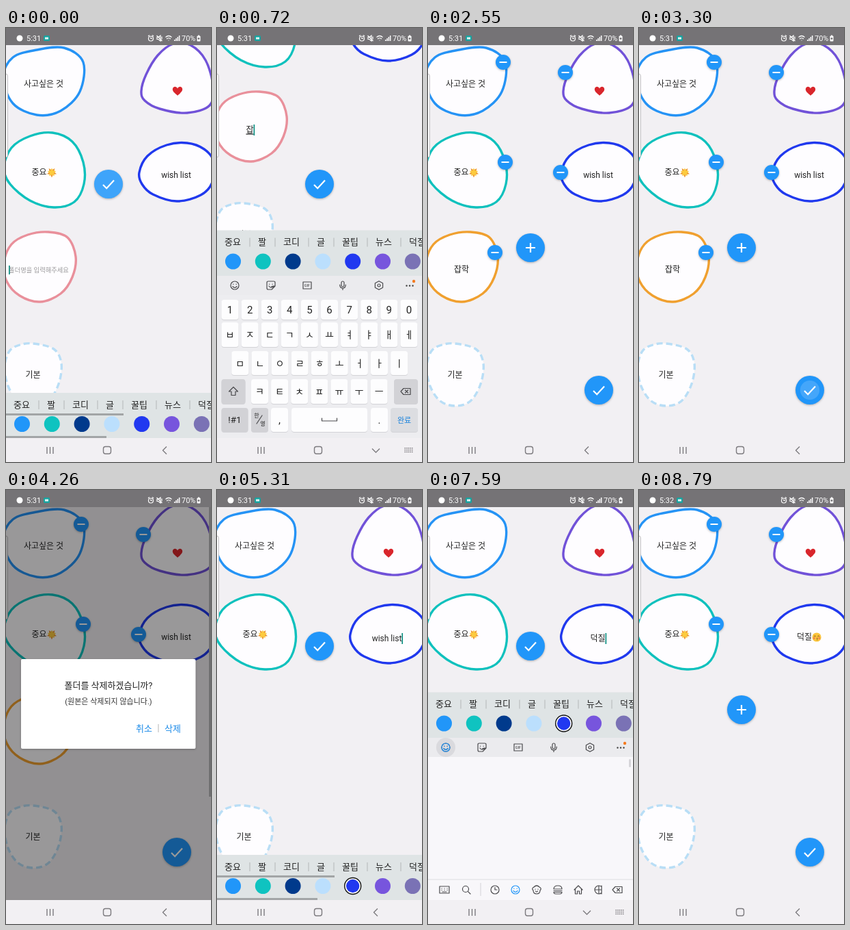
An HTML page for the animation above (9150 ms loop, 300 px wide and 634 px high).

```html
<!DOCTYPE html>
<html lang="ko">
<head>
<meta charset="utf-8">
<title>Folder bubbles</title>
<style>
html, body { margin: 0; width: 100%; height: 100%; overflow: hidden; background: #f2f0f3; }
svg { display: block; width: 300px; height: 634px; font-family: Roboto, "Noto Sans CJK KR", "Noto Sans CJK JP", "Noto Sans CJK", sans-serif; }
.fab, .minus { filter: drop-shadow(0 1.5px 1.5px rgba(0, 0, 0, .28)); }
.icon { fill: none; stroke: #4a4a4d; stroke-width: 1.2; stroke-linecap: round; stroke-linejoin: round; }
.nav { fill: none; stroke: #7d7b7f; stroke-width: 1.4; stroke-linejoin: round; }
</style>
</head>
<body>
<svg id="stage" viewBox="0 0 300 634"></svg>
<script>
const LOOP = 9150;
const BLUE = '#2196f9';
const $ = id => document.getElementById(id);
const show = (id, on) => $(id).setAttribute('visibility', on ? 'visible' : 'hidden');
const move = (id, x, y) => $(id).setAttribute('transform', `translate(${x} ${y})`);
const fade = (id, v) => $(id).setAttribute('opacity', v);

// Linear track through time, value pairs
function track(t, ...p) {
  if (t <= p[0]) return p[1];
  for (let i = 2; i < p.length; i += 2)
    if (t < p[i]) return p[i - 1] + (p[i + 1] - p[i - 1]) * (t - p[i - 2]) / (p[i] - p[i - 2]);
  return p[p.length - 1];
}

const latest = (t, steps) => steps.reduce((v, [at, s]) => t >= at ? s : v, '');

// (x, y) is the visual middle of the text
const text = (x, y, s, size, fill = '#222', anchor = 'middle') =>
  `<text x="${x}" y="${y}" dy=".37em" font-size="${size}" fill="${fill}" text-anchor="${anchor}">${s}</text>`;
const rect = (x, y, w, h, fill, r = 0) =>
  `<rect x="${x}" y="${y}" width="${w}" height="${h}" rx="${r}" fill="${fill}"/>`;
const circle = (x, y, r, fill, more = '') => `<circle cx="${x}" cy="${y}" r="${r}" fill="${fill}" ${more}/>`;
const icon = (x, y, d, color = '#4a4a4d') =>
  `<path class="icon" transform="translate(${x} ${y})" d="${d}" style="stroke:${color}"/>`;

// Smooth closed outline through flat x, y pairs
function blob(p) {
  const n = p.length / 2;
  const at = i => [p[(i + n) % n * 2], p[(i + n) % n * 2 + 1]];
  let d = `M${at(0)}`;
  for (let i = 0; i < n; i++) {
    const [a, b, c, e] = [at(i - 1), at(i), at(i + 1), at(i + 2)];
    d += `C${b.map((v, k) => v + (c[k] - a[k]) / 6)} ${c.map((v, k) => v - (e[k] - b[k]) / 6)} ${c}`;
  }
  return d + 'Z';
}
const bubble = (id, color, points, more = '') =>
  `<path id="${id}" d="${blob(points)}" fill="#fefdff" stroke="${color}" stroke-width="3.4" ${more}/>`;

const minus = (x, y) => `<g class="minus">${circle(x, y, 11, BLUE)}${rect(x - 5.5, y - 1, 11, 2, '#fff')}</g>`;
const CHECK = 'M-8 1l5.2 5.2L8-5.5';
const PLUS = 'M-7 0H7M0-7V7';
const fab = (id, x, y, d) => `<g id="${id}" transform="translate(${x} ${y})">
  <g class="fab">${circle(0, 0, 21, BLUE)}</g>${circle(0, 0, 21, '#fff', `id="${id}Ripple" opacity="0"`)}
  <path d="${d}" fill="none" stroke="#fff" stroke-width="2.2"/></g>`;

const HEART = 'M0 6.8C-4 3-7.2 1-7.2-2.4C-7.2-6.8-1.6-7.6 0-3.6C1.6-7.6 7.2-6.8 7.2-2.4C7.2 1 4 3 0 6.8Z';
const FACE = `<g id="face">${circle(0, 0, 6.6, '#fbc43b')}${circle(-3.7, 1.4, 1.6, '#f08a4b')}${circle(3.7, 1.4, 1.6, '#f08a4b')}
  <path d="M-4-1q1.4-2 2.8 0M1.2-1q1.4-2 2.8 0M0 1q2 .7 .3 1.6q1.8 .8 0 1.7" fill="none" stroke="#6b4316" stroke-width=".9"/></g>`;

function star(x, y) {
  let d = '';
  for (let i = 0; i < 10; i++) {
    const a = Math.PI * i / 5 - Math.PI / 2, r = i % 2 ? 3.2 : 6.6;
    d += `${i ? 'L' : 'M'}${r * Math.cos(a)} ${r * Math.sin(a)}`;
  }
  return `<g transform="translate(${x} ${y})"><path d="${d}Z" fill="#ef9a35" transform="rotate(36) scale(1.12)"/>
    <path d="${d}Z" fill="#fccb3e"/></g>`;
}

const field = id => `<text id="${id}" dy=".37em" font-size="12" fill="#222"></text>
  <rect id="${id}Caret" width="1.6" fill="#00897b"/><use id="${id}Face" href="#face"/>`;

function setField(id, x, y, s, { editing, composing, face }) {
  const el = $(id), empty = !s, size = empty ? 9.3 : 12;
  const body = empty ? '폴더명을 입력해주세요' :
    composing ? `${s.slice(0, -1)}<tspan text-decoration="underline">${s.slice(-1)}</tspan>` : s;
  if (el.body !== body) {
    el.innerHTML = el.body = body;
    el.setAttribute('font-size', size);
    el.setAttribute('fill', empty ? '#9b9a9c' : '#222');
    el.setAttribute('style', 'white-space:pre');
  }
  const w = el.getComputedTextLength(), left = x - (w + (face ? 14 : 0)) / 2;
  el.setAttribute('x', left);
  el.setAttribute('y', y);
  move(id + 'Face', left + w + 7, y);
  show(id + 'Face', face);
  const caret = $(id + 'Caret');
  caret.setAttribute('x', empty ? left : left + w + (face ? 14 : 0));
  caret.setAttribute('y', y - (empty ? 7 : 8));
  caret.setAttribute('height', empty ? 13 : 16);
  show(id + 'Caret', editing);
}

const palette = [BLUE, '#0fc3c0', '#003a8c', '#bbdffd', '#2138f0', '#7755dd', '#7a72b5',
  '#c8ccd2', '#e0dad9', '#a97fc4', '#e9909b', '#f0a02f', '#f5c94a', '#8bc48a'];

function chips() {
  let x = 11;
  return ['중요', '짤', '코디', '글', '꿀팁', '뉴스', '덕질'].map(s => {
    const out = text(x, 17, s, 13, '#222', 'start') + rect(x + s.length * 12 + 12.5, 11, 1, 13, '#b3b6b7');
    x += s.length * 12 + 25;
    return out;
  }).join('');
}

const key = (x, y, w, h, label, size = 14, fill = '#fdfdfe', color = '#222') =>
  rect(x, y + 1, w, h, '#d3d3d7', 4) + rect(x, y, w, h, fill, 4) + text(x + w / 2, y + h / 2, label, size, color);
const row = (chars, x, y, h, size) =>
  [...chars].map((c, i) => key(x + i * 29.1, y, 25, h, c, size)).join('');

const SMILE = 'M6 0A6 6 0 1 1-6 0A6 6 0 1 1 6 0M-3 1.5q3 3.6 6 0M-2.2-2v.4M2.2-2v.4';
const STICKER = 'M6 1V-4Q6-6 4-6H-4Q-6-6-6-4V4Q-6 6-4 6H1ZL1 3Q1 1 3 1H6M-3 1q2 3 4 1M-2.4-2v.3M2.2-2v.3';
const ERASE = 'M-7 0L-3-4.5H7V4.5H-3ZM-.5-2L3.5 2M3.5-2L-.5 2';
const GREY = '#d2d2d6';

const toolbar = () => rect(0, 0, 300, 28, '#ebebee') +
  circle(26, 14, 14, '#dadade', 'id="tabOn"') +
  icon(26, 14, SMILE) + `<g id="smileOn">${icon(26, 14, SMILE, BLUE)}</g>` + icon(79, 14, STICKER) +
  icon(132, 14, 'M-6-5H6V5H-6Z') + text(132, 14, 'GIF', 5.5, '#333') +
  icon(184, 14, 'M-2-4a2 2 0 0 1 4 0V0a2 2 0 0 1-4 0ZM-4.3-1Q-4.3 4 0 4T4.3-1M0 4V6.5') +
  icon(237, 14, 'M0-6.3L5.6-3.2V3.2L0 6.3L-5.6 3.2V-3.2ZM2 0A2 2 0 1 1-2 0A2 2 0 1 1 2 0') +
  [277.5, 282, 286.5].map(x => circle(x, 14.5, 1.2, '#444')).join('') + circle(288, 8, 2.2, '#f47b20');

const keys = () => rect(0, 28, 300, 209, '#ededf0') +
  row('1234567890', 6.5, 35, 29, 15) + row('ㅂㅈㄷㄱㅅㅛㅕㅑㅐㅔ', 6.5, 68, 36) +
  row('ㅁㄴㅇㄹㅎㅗㅓㅏㅣ', 21.3, 110, 35) + row('ㅋㅌㅊㅍㅠㅜㅡ', 50, 151, 36) +
  key(6.5, 151, 35, 36, '', 14, GREY) + icon(24, 169, 'M0-6.5L6.5 0H3V5.5H-3V0H-6.5Z') +
  key(259, 151, 35, 36, '', 14, GREY) + icon(276, 169, ERASE) +
  key(6.5, 193, 39, 35, '!#1', 13.5, GREY) + key(50, 193, 25, 35, '', 10, GREY) +
  text(58, 204, '한', 8) + text(67, 216, '영', 8) + icon(62, 210, 'M4-6L-4 6') +
  key(79, 193, 25, 35, ',', 15) + key(109, 193, 111, 35, '') + icon(164.5, 210, 'M-11-2V2H11V-2') +
  key(225, 193, 25, 35, '.', 15) + key(254, 193, 40, 35, '완료', 11, '#dcdde1', '#1680dc');

function faces() {
  let out = '';
  for (let i = 0; i < 40; i++)
    out += `<use href="#face" transform="translate(${23 + i % 8 * 36} ${49 + (i >> 3) * 36}) scale(1.6)"/>`;
  return out;
}

const emojiPane = () => rect(0, 28, 300, 209, '#f8f7fa') + `<g id="faces">${faces()}</g>` +
  rect(294, 31, 3, 12, '#d6d5d9', 1.5) + rect(0, 207, 300, 30, '#f8f7fa') + rect(0, 206.5, 300, 1, '#dedde1') +
  icon(24, 222, 'M-7-5H7V5H-7ZM-4-2h.3M0-2h.3M4-2h.3M-4 .5h.3M0 .5h.3M4 .5h.3M-3 3H3') +
  icon(56, 222, 'M3.5-1A4.5 4.5 0 1 1-5.5-1A4.5 4.5 0 1 1 3.5-1M2.3 2.3L6 6') +
  rect(76.5, 212, 1, 19, '#d2d1d5') +
  icon(98, 222, 'M6 0A6 6 0 1 1-6 0A6 6 0 1 1 6 0M0-3.5V0H3') + icon(128, 222, SMILE, BLUE) +
  icon(159, 222, 'M-4-4Q0-8 4-4Q8-2 5 1Q5 6 0 6T-5 1Q-8-2-4-4M-2-1v.3M2-1v.3M-1.5 2Q0 4 1.5 2') +
  icon(190, 222, 'M-6-1Q-6-6 0-6T6-1ZM-6 1.5H6M-6 3.5H6Q6 6 3 6H-3Q-6 6-6 3.5') +
  icon(220, 222, 'M-6 0L0-6L6 0M-4.5-1V6H-1.5V2H1.5V6H4.5V-1') +
  icon(250, 222, 'M4-4.5A6 6 0 1 0 4 4.5M0-6V6M-6 0H4M4-6V6') + icon(277, 222, ERASE);

const statusBar = () => rect(0, 0, 300, 25, '#757376') + circle(20, 15, 4.5, '#fff') +
  `<text id="clock" x="30" y="19" font-size="11" fill="#fff"></text>` +
  rect(55, 11, 9, 8, '#18a3a0', 1.5) + rect(57, 13.5, 5, 3, '#dff5f3') +
  `<g fill="none" stroke="#fff" stroke-width="1.2"><path d="M215.5 15.5a3.5 3.5 0 1 1-7 0a3.5 3.5 0 1 1 7 0M212 13.5V15.5H214M208 12l2-1.5M216 12l-2-1.5"/>
   <path d="M221 13.5h2l3-2.5v8l-3-2.5h-2ZM220.5 11l8 8M228 12.5v4"/><path d="M233.5 13.5q4.5-4 9 0M235 16q3-2.5 6 0M237.5 18h1"/></g>` +
  [0, 1, 2, 3].map(i => rect(246 + i * 2.3, 17 - i * 2, 1.5, 2 + i * 2, '#fff')).join('') +
  `<text x="257" y="19" font-size="11" fill="#fff">70%</text>` +
  rect(279.5, 11.5, 5, 8, '#fff', 1) + rect(281, 10.5, 2, 2, '#fff') + circle(282, 15.5, 1.4, '#757376');

const keyboardDots = () => [0, 1, 2].map(r => [0, 1, 2, 3, 4].map(c =>
  rect(274.5 + c * 2.6, 613 + r * 2.8, 1.5, 1.5, '#7d7b7f')).join('')).join('');

const dialog = () => rect(0, 25, 300, 574, 'rgba(0,0,0,.4)') +
  `<g class="fab">${rect(22, 247, 255.5, 131, '#fff', 2)}</g>` +
  text(150, 285, '폴더를 삭제하겠습니까?', 13) + text(150, 309, '(원본은 삭제되지 않습니다.)', 11, '#333') +
  text(202, 348, '취소', 13, '#1c8be8') + rect(222.5, 342, 1, 12, '#b5b5b5') + text(244, 348, '삭제', 13, '#1c8be8');

$('stage').innerHTML = `<defs>${FACE}</defs>
${rect(0, 0, 300, 634, '#f2f0f3')}
<g id="content">
  ${bubble('shop', '#2593f5', [-4, 72, 10, 43, 45, 32, 85, 29, 113, 50, 108, 93, 80, 121, 45, 127, 10, 110])}
  ${text(55, 82, '사고싶은 것', 12)}
  ${bubble('love', '#7152d8', [198, 92, 205, 68, 222, 40, 245, 23, 270, 25, 292, 47, 303, 85, 298, 113, 265, 124, 225, 118, 203, 106])}
  <path d="${HEART}" transform="translate(251 92)" fill="#d9262c"/>
  ${bubble('key', '#0fc1bd', [68, 153, 97, 166, 113, 196, 114, 228, 100, 254, 70, 262, 35, 252, 6, 228, -3, 204, 8, 175, 35, 158])}
  ${text(48.5, 211, '중요', 12)}${star(67, 211)}
  ${bubble('wish', '#2039ee', [195, 211, 207, 187, 235, 171, 265, 168, 290, 177, 304, 195, 302, 225, 285, 244, 250, 253, 215, 243, 199, 228])}
  ${field('wishText')}
  <g id="fresh">${bubble('freshShape', '#e9909b', [62, 298, 90, 306, 102, 334, 97, 364, 80, 388, 50, 400, 20, 391, 1, 370, -3, 343, 8, 316, 32, 302])}
  ${field('freshText')}</g>
  ${bubble('base', '#b9def6', [40, 461, 70, 469, 81, 490, 77, 520, 62, 545, 40, 552, 18, 545, 3, 523, -2, 495, 5, 472, 20, 463], 'stroke-dasharray="9 5"')}
  ${text(39.5, 507, '기본', 12)}
</g>
<rect x="-6" y="67" width="8.5" height="122" rx="3" fill="#fafafa" stroke="#b5b4b6" stroke-width=".8"/>
<g id="edit">${minus(110, 50)}${minus(201, 65)}${minus(113, 196)}${minus(194, 211)}<g id="freshMinus">${minus(98, 328)}</g>
  ${fab('add', 150, 321, PLUS)}${fab('done', 250, 529, CHECK)}</g>
<g id="scrollbar">${rect(297, 25, 3, 423, '#b9b8ba')}</g>
<g id="input">${fab('save', 150, 228, CHECK)}
  <g id="panel">${rect(0, 0, 300, 67, '#dfe4e5')}${chips()}
    <g id="colors">${palette.map((c, i) => circle(23.5 + i * 43.8, 45.5, 11.5, c)).join('')}
      <g id="ring">${circle(0, 45.5, 12, '#fff', 'id="ringEdge" stroke-width="1.4"')}${circle(0, 45.5, 9.7, '#fff', 'id="ringFill"')}</g></g>
    <g id="bars">${rect(0, 30, 172, 3, '#a2a5a6')}${rect(0, 63, 147, 3, '#a2a5a6')}</g></g>
  <g id="keyboard"><g id="keys">${keys()}</g><g id="emoji">${emojiPane()}</g>${toolbar()}</g></g>
${rect(0, 599, 300, 35, '#f2f0f3')}
<path class="nav" d="M60 612V622M64.5 612V622M69 612V622"/><rect class="nav" x="142.5" y="611.5" width="11" height="10.5" rx="3"/>
<path class="nav" id="back" d="M235 611.5L229.5 617L235 622.5"/>
<g id="hide"><path class="nav" d="M227 614.5L232.5 620L238 614.5"/>${keyboardDots()}</g>
<g id="dialog">${dialog()}</g>
${statusBar()}`;

const freshSteps = [[300, 'ㅈ'], [450, '자'], [630, '잡'], [780, '잡ㅎ'], [960, '잡하'], [1140, '잡학']];
const wishSteps = [[0, 'wish list'], [5850, 'wish lis'], [5940, 'wish li'], [6030, 'wish l'], [6120, 'wish '],
  [6210, 'wish'], [6270, 'wis'], [6330, 'wi'], [6420, 'w'], [6480, ''],
  [6630, 'ㄷ'], [6780, '더'], [6900, '덕'], [7050, '덕ㅈ'], [7200, '덕지'], [7350, '덕질']];
const freshColor = [[0, 10], [1590, 9], [1830, 7], [2040, 11]];
const picked = [[0, 10], [1590, 9], [1770, 7], [2040, 11], [5000, 4]];

function draw(t) {
  const first = t < 2370, second = t >= 5310 && t < 8610, input = first || second;
  const up = track(t, 30, 0, 150, 1, 2190, 1, 2340, 0, 5370, 0, 5520, 1, 8430, 1, 8580, 0);
  const emoji = t >= 7500;

  move('content', 0, -track(t, 30, 0, 150, 205, 2190, 205, 2340, 0));
  move('panel', 0, 533 - 237.5 * up);
  move('keyboard', 0, 599 - 237 * up);
  show('input', input);
  show('edit', !input);
  for (const [id, on] of [['keys', !emoji], ['emoji', emoji], ['tabOn', emoji], ['smileOn', emoji], ['faces', t >= 7620]])
    $(id).style.display = on ? '' : 'none';
  show('back', up < .5);
  show('hide', up >= .5);
  fade('bars', track(t, 300, 1, 480, 0, 5300, 0, 5310, 1, 5520, 1, 5700, 0));

  move('colors', -track(t, 1260, 0, 1500, 200, 1680, 200, 1770, 94, 1860, 94, 2010, 290, 5000, 290, 5001, 0), 0);
  const sel = latest(t, picked);
  move('ring', 23.5 + sel * 43.8, 0);
  $('ringFill').setAttribute('fill', palette[sel]);
  $('ringEdge').setAttribute('stroke', sel === 7 ? '#8f9296' : '#111');
  $('freshShape').setAttribute('stroke', palette[latest(t, freshColor)]);

  setField('freshText', first ? 48 : 49, first ? 354 : 353, latest(t, freshSteps),
    { editing: first, composing: first, face: false });
  setField('wishText', second ? 248.5 : 249, second ? 217 : 215, latest(t, wishSteps),
    { editing: second, composing: t >= 6630 && t < 7500, face: t >= 8010 });

  fade('fresh', track(t, 4860, 1, 5040, 0));
  show('freshMinus', !input && t < 4860);
  fade('saveRipple', track(t, 30, .13, 150, 0));
  $('doneRipple').setAttribute('r', track(t, 3300, 14, 3390, 21));
  fade('doneRipple', t < 3300 ? 0 : track(t, 3300, .16, 3390, .13, 3510, 0));
  fade('scrollbar', track(t, 3690, 0, 3930, 1, 4800, 1, 5040, 0));
  fade('dialog', t < 4260 ? 0 : track(t, 4710, 1, 4830, 0));
  $('clock').textContent = t < 8100 ? '5:31' : '5:32';
}

const start = performance.now();
function tick() {
  draw((performance.now() - start) % LOOP);
  requestAnimationFrame(tick);
}
tick();
</script>
</body>
</html>
```
